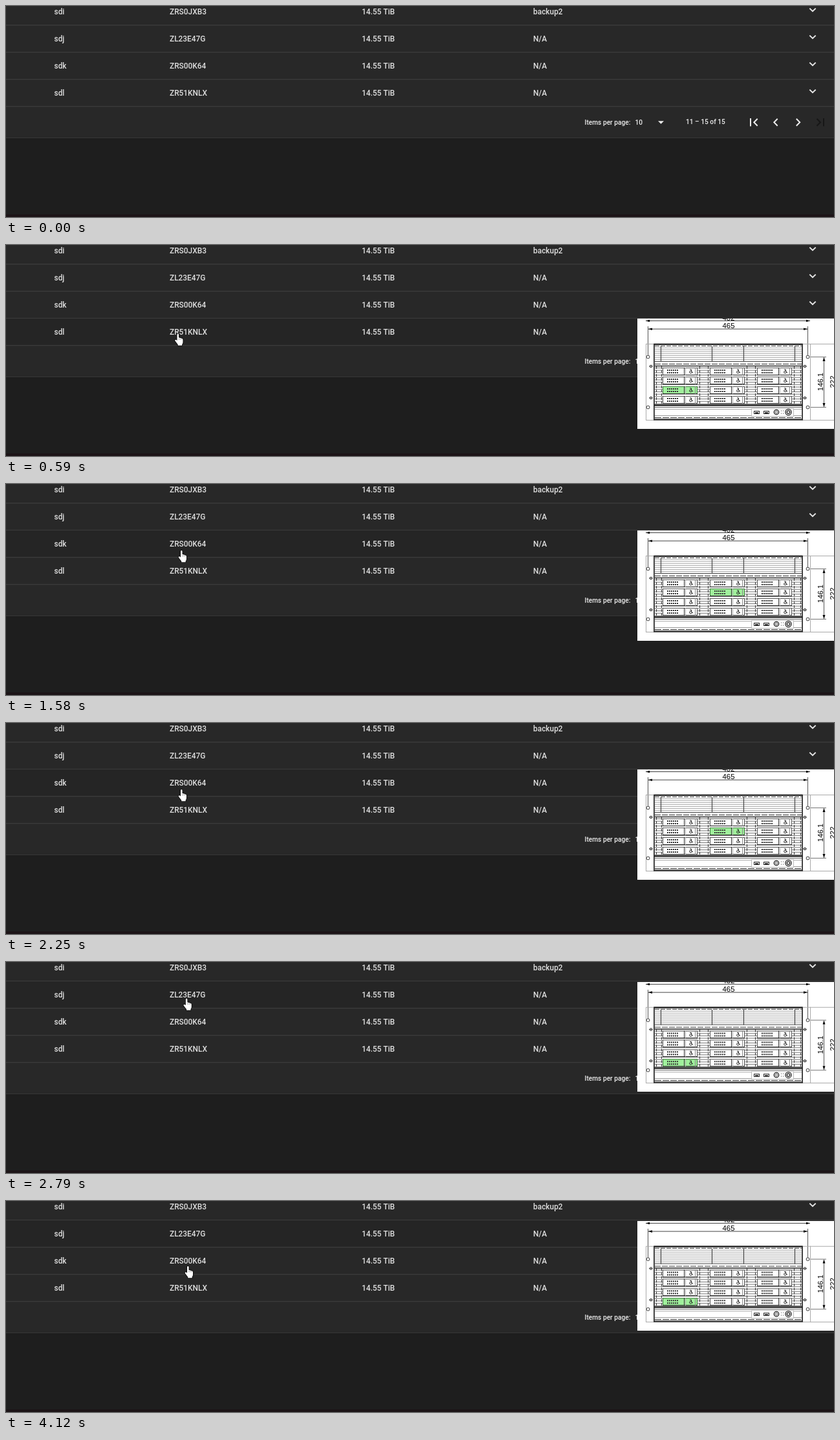
An HTML page with a canvas that plays this animation: 1280 by 327 pixels, repeating every 4.18 s.

```html
<!DOCTYPE html>
<html lang="en">
<head>
<meta charset="utf-8">
<title>Disk list</title>
<style>
html, body { margin: 0; width: 100%; height: 100%; overflow: hidden; background: #1e1e1e; }
canvas { display: block; }
</style>
</head>
<body>
<canvas id="stage" width="1280" height="327"></canvas>
<script>
const ctx = document.getElementById('stage').getContext('2d', { alpha: false });
const LOOP = 4180, TICK = 66.35;
const DIM_FONT = '11.3px "Liberation Sans", sans-serif';

const DISKS = [
  ['sdi', 'ZRS0JXB3', 'backup2'],
  ['sdj', 'ZL23E47G', 'N/A'],
  ['sdk', 'ZRS00K64', 'N/A'],
  ['sdl', 'ZR51KNLX', 'N/A']
];

const POPUPS = [
  { time: 590, top: 114, bottom: 285, col: 0, row: 2, disk: 3 },
  { time: 1580, top: 72, bottom: 243, col: 1, row: 1, disk: 2 },
  { time: 2790, top: 31, bottom: 201, col: 0, row: 3, disk: 1 }
];

// time, x, y of the hand
const PATH = [
  [130, 253, 262], [520, 260.5, 137],
  [1060, 260.5, 137], [1520, 266, 102.5],
  [2390, 266, 102.5], [2650, 273.8, 56],
  [3585, 273.8, 56], [4114, 276, 100.5]
];

function rect(x, y, w, h, color) {
  ctx.fillStyle = color;
  ctx.fillRect(x, y, w, h);
}

function box(x, y, w, h, color = '#222', width = 1) {
  ctx.strokeStyle = color;
  ctx.lineWidth = width;
  ctx.strokeRect(x, y, w, h);
}

function line(points, color, width = 1, dash = []) {
  ctx.strokeStyle = color;
  ctx.lineWidth = width;
  ctx.setLineDash(dash);
  ctx.beginPath();
  for (let i = 0; i < points.length; i += 2) ctx.lineTo(points[i], points[i + 1]);
  ctx.stroke();
  ctx.setLineDash([]);
}

function ring(x, y, r, color = '#222', width = 1) {
  ctx.strokeStyle = color;
  ctx.lineWidth = width;
  ctx.beginPath();
  ctx.arc(x, y, r, 0, 7);
  ctx.stroke();
}

function fill(points, color) {
  ctx.fillStyle = color;
  ctx.beginPath();
  for (let i = 0; i < points.length; i += 2) ctx.lineTo(points[i], points[i + 1]);
  ctx.fill();
}

function text(str, x, y, font, color, align = 'left') {
  ctx.font = font;
  ctx.fillStyle = color;
  ctx.textAlign = align;
  ctx.fillText(str, x, y);
}

function sideText(str, x, y) {
  ctx.save();
  ctx.translate(x, y);
  ctx.rotate(-Math.PI / 2);
  text(str, 0, 0, DIM_FONT, '#000', 'center');
  ctx.restore();
}

// Chevron pointing left (dir -1) or right (dir 1)
function angle(x, dir, color) {
  line([x - 2.7 * dir, 174.7, x + 2.7 * dir, 180.2, x - 2.7 * dir, 185.7], color, 2);
}

function drawTable(hovered) {
  rect(0, 0, 1280, 327, '#1e1e1e');
  rect(0, 0, 1280, 205, '#282828');
  rect(0, 204, 1280, 1, '#383838');
  rect(0, 205, 1280, 1, '#191919');
  rect(0, 323, 1280, 4, '#1c1417');
  const font = '500 11.9px Roboto, sans-serif', color = '#dedede';
  DISKS.forEach(([name, serial, pool], i) => {
    const y = 42 * i;
    if (i === hovered) rect(0, y - 12, 1280, 41, '#252525');
    text(name, 74.5, y + 13, font, color);
    text(serial, 253, y + 13, font, color);
    text('14.55 TiB', 550, y + 13, font, color);
    text(pool, 815, y + 13, font, color);
    line([1242.3, y + 3.6, 1247, y + 8.2, 1251.7, y + 3.6], '#e6e6e6', 2);
    rect(0, y + 29, 1280, 1, '#3c3c3c');
    rect(0, y + 30, 1280, 1, '#2d2d2d');
  });
  const small = '500 10.2px Roboto, sans-serif', white = '#ececec';
  text('Items per page:', 894.5, 184, small, white);
  text('10', 972.5, 184, small, white);
  text('11 – 15 of 15', 1051, 183, small, white);
  fill([1008, 178.3, 1017, 178.3, 1012.5, 182.7], white);
  rect(1150, 174, 2, 12.4, white);
  angle(1159, -1, white);
  angle(1190, -1, white);
  angle(1224.5, 1, white);
  const off = '#171717';
  angle(1256.2, 1, off);
  rect(1263, 174, 2, 12.4, off);
}

function arrowLine(x1, x2, y) {
  line([x1, y, x2, y], '#444');
  fill([x1, y, x1 + 6, y - 1.8, x1 + 6, y + 1.8], '#000');
  fill([x2, y, x2 - 6, y - 1.8, x2 - 6, y + 1.8], '#000');
}

function drawDimensions() {
  text('482', 1117, 2.5, DIM_FONT, '#000', 'center');
  text('465', 1117, 15.3, DIM_FONT, '#000', 'center');
  arrowLine(989, 1243, 3.5);
  arrowLine(993, 1239, 16.2);
  for (const x of [992.5, 1239.5]) line([x, 12, x, 57], '#555');
  for (const y of [39.5, 157.5]) line([1243, y, 1280, y], '#aaa');
  for (const y of [59.5, 137.5]) line([1243, y, 1268, y], '#777');
  line([1264.5, 60, 1264.5, 137], '#555');
  fill([1264.5, 60, 1262.5, 66, 1266.5, 66], '#000');
  fill([1264.5, 137, 1262.5, 131, 1266.5, 131], '#000');
  sideText('146.1', 1263, 98);
  sideText('222', 1282, 98);
}

function drawBay(x, y, lit) {
  rect(x, y, 54, 12, lit ? '#a0f09c' : '#fff');
  box(x + .5, y + .5, 53, 11, lit ? '#3c7a3c' : '#555');
  rect(x, y + 11, 54, 1, '#222');
  for (let i = 0; i < 6; i++) {
    rect(x + 7 + i * 3, y + 3, 2, 2, '#333');
    rect(x + 7 + i * 3, y + 7, 2, 2, '#333');
  }
  line([x + 33.5, y, x + 33.5, y + 12], '#333');
  line([x + 35.5, y, x + 35.5, y + 12], '#aaa');
  line([x + 50.5, y, x + 50.5, y + 12], '#888');
  ring(x + 43.5, y + 7, 1.8);
  line([x + 42, y + 3, x + 44.5, y + 3, x + 44.5, y + 6, x + 47, y + 8], '#222');
}

function drawChassis(col, row) {
  // ears, holes and screws
  for (const [x, hole, screw] of [[989.5, 992.5, 997], [1231.5, 1239.5, 1235]]) {
    box(x, 39.5, 12, 118, '#aaa');
    for (const y of [59.5, 137.5]) ring(hole, y, 2.4, '#333');
    for (const y of [74, 123]) {
      ring(screw, y, 1.8, '#333');
      line([screw - 3, y, screw + 3, y], '#555');
    }
  }
  box(1002, 39.5, 229, 117.5, '#222', 1.6);

  // ridged lid
  rect(1002, 39, 229, 2, '#222');
  line([1003, 42.5, 1230, 42.5], '#333', 1, [7, 2]);
  for (let y = 45.5; y < 66; y += 3) line([1003, y, 1230, y], '#aaa');
  for (const x of [1012.5, 1091.5, 1140.5, 1219.5]) line([x, 43, x, 67], '#333');
  line([1003, 66.5, 1230, 66.5], '#444');
  line([1003, 70.5, 1230, 70.5], '#333', 1, [9, 2]);
  line([1003, 73.5, 1230, 73.5], '#222', 1.5);

  // ribs behind the bays
  for (let y = 76.5; y < 133; y += 3.7) line([1003, y, 1230, y], '#777');
  for (const x of [1005.5, 1013.5, 1072.5, 1085.5, 1145.5, 1158.5, 1218.5, 1228.5])
    line([x, 74, x, 133], '#333', 1, [4, 2]);
  for (let c = 0; c < 3; c++)
    for (let r = 0; r < 4; r++)
      drawBay(1015 + 73 * c, Math.round(75.5 + 14.7 * r), c === col && r === row);

  // foot with ports
  rect(1002, 133, 229, 2.5, '#222');
  line([1003, 137.5, 1230, 137.5], '#666');
  line([1003, 140.5, 1230, 140.5], '#aaa');
  line([1003, 150.5, 1230, 150.5], '#999');
  line([1003, 153.5, 1230, 153.5], '#333', 1, [10, 2]);
  line([1003, 155.5, 1230, 155.5], '#555');
  rect(1152, 139, 66, 13, '#fff');
  box(1152.5, 139.5, 65, 12, '#bbb');
  for (const x of [1156, 1171]) {
    box(x + .5, 143.5, 8, 4, '#222');
    rect(x + 2, 145, 5, 2, '#333');
  }
  ring(1191, 145, 3.7, '#222', 1.3);
  ring(1191, 145, 1.8, '#555');
  for (const y of [142, 146]) for (const x of [1198, 1201]) rect(x, y, 1, 2, '#999');
  ring(1209.5, 145, 4.6, '#222', 1.3);
  ring(1209.5, 145, 2.3, '#222', 1.3);
}

function drawPopup({ top, bottom, col, row }) {
  ctx.save();
  ctx.translate(0, top);
  ctx.scale(1, (bottom - top) / 171);
  ctx.beginPath();
  ctx.rect(976, 0, 304, 171);
  ctx.clip();
  rect(976, 0, 304, 171, '#fff');
  drawDimensions();
  drawChassis(col, row);
  ctx.restore();
}

const HAND = new Path2D('M4 11V2Q4 .6 5.3 .6T6.6 2V6.6Q7.6 6 8.6 7.1Q9.8 6.6 10.7 7.8' +
  'Q13 7.6 13 10V13.5Q13 15.5 11.7 17V18.7H5.2V17.2L.8 11.6Q.2 10.3 1.3 9.9T4 11Z');

function drawHand(x, y) {
  ctx.save();
  ctx.translate(x, y);
  ctx.strokeStyle = '#000';
  ctx.lineWidth = 1.5;
  ctx.stroke(HAND);
  ctx.fillStyle = '#fff';
  ctx.fill(HAND);
  for (const k of [6.7, 8.7, 10.7]) line([k, 7.5, k, 10], '#777', .6);
  ctx.restore();
}

function handAt(t) {
  const i = PATH.findIndex(p => p[0] > t);
  if (i < 0) return PATH[PATH.length - 1].slice(1);
  const [t0, x0, y0] = PATH[i - 1], [t1, x1, y1] = PATH[i];
  const u = (t - t0) / (t1 - t0), e = u * u * (3 - 2 * u);
  return [x0 + (x1 - x0) * e, y0 + (y1 - y0) * e];
}

function draw(now) {
  const t = now % LOOP;
  const popup = POPUPS.filter(p => p.time <= t).pop();
  drawTable(popup?.disk);
  if (popup) drawPopup(popup);
  // the pointer moves in about 15 steps a second
  if (t >= 130) drawHand(...handAt(Math.max(130, Math.floor(t / TICK + .2) * TICK)));
}

let start;
function frame(now) {
  start ??= now;
  draw(now - start);
  requestAnimationFrame(frame);
}
draw(0);
requestAnimationFrame(frame);
</script>
</body>
</html>
```
